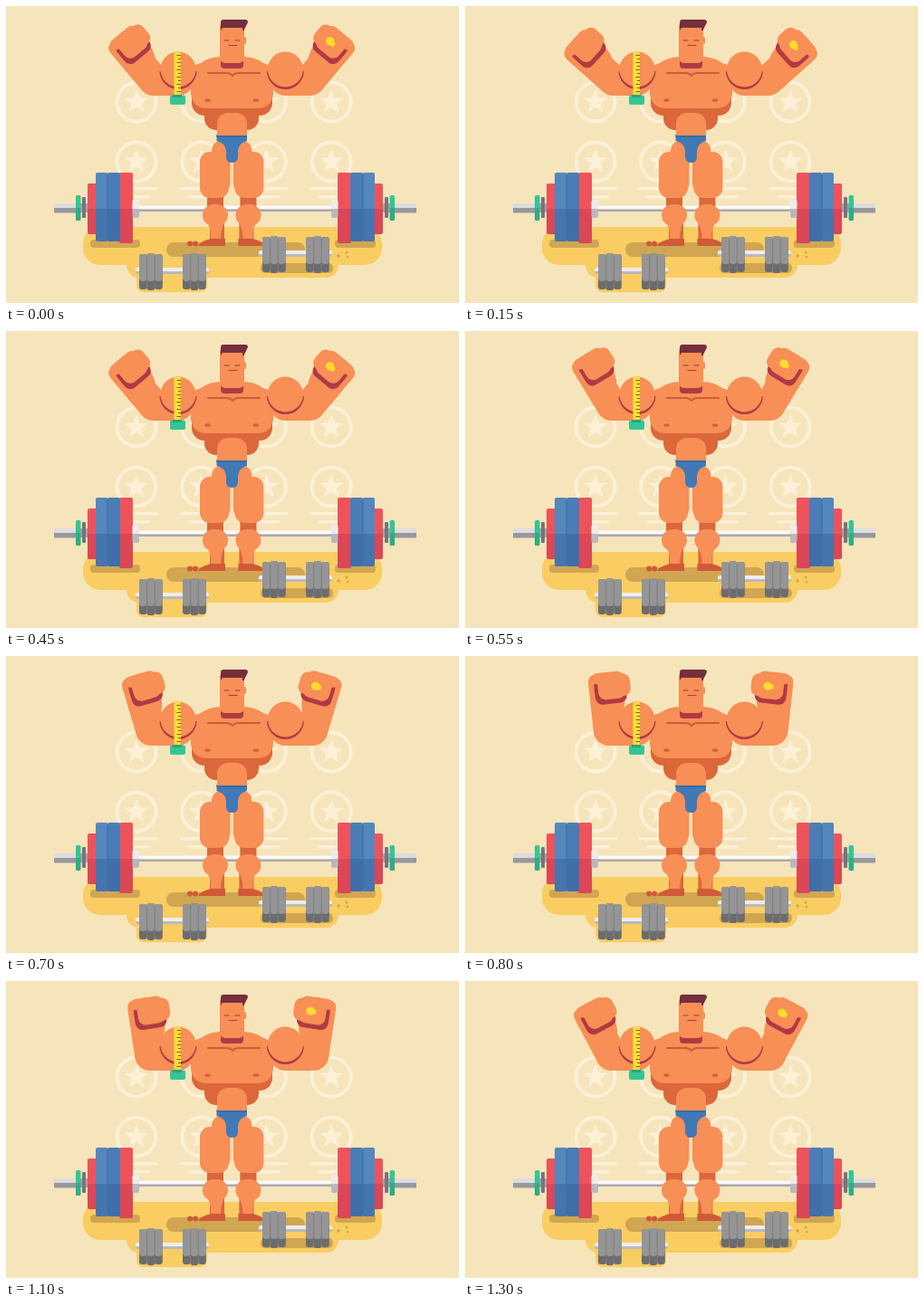
Write an HTML page with a canvas that moves like this. It is 500x328 px and loops after 1.35 s.

```html
<!DOCTYPE html>
<html lang="en">
<head>
<meta charset="utf-8">
<title>Bodybuilder</title>
<style>
  html, body { margin: 0; width: 100%; height: 100%; overflow: hidden; background: #f6e4bb; }
  canvas { display: block; }
</style>
</head>
<body>
<canvas id="stage" width="500" height="328"></canvas>
<script>
const ctx = document.getElementById('stage').getContext('2d');
const LOOP = 1350, STEP = 50, BODY_AXIS = 249.2, BAR_AXIS = 253;
const SKIN = '#f78f56', SHADE = '#dc673b', DARK = '#b23943';

// Arm flexion, one key every 225 ms, with a lead-in and lead-out key
const FLEX = [.5, .2, 0, .2, .62, 1, .79, .34, 0];

function box(x1, y1, x2, y2, r, color) {
  ctx.fillStyle = color;
  ctx.beginPath();
  ctx.roundRect(x1, y1, x2 - x1, y2 - y1, r);
  ctx.fill();
}

function disc(x, y, rx, color, ry = rx) {
  ctx.fillStyle = color;
  ctx.beginPath();
  ctx.ellipse(x, y, rx, ry, 0, 0, 7);
  ctx.fill();
}

function shape(d, color) {
  ctx.fillStyle = color;
  ctx.fill(new Path2D(d));
}

function line(d, color, width) {
  ctx.strokeStyle = color;
  ctx.lineWidth = width;
  ctx.lineJoin = ctx.lineCap = 'round';
  ctx.stroke(new Path2D(d));
}

function mirrored(axis, draw) {
  draw(false);
  ctx.save();
  ctx.translate(2 * axis, 0);
  ctx.scale(-1, 1);
  draw(true);
  ctx.restore();
}

// Rounded bar whose lower part is darker
function twoTone(x1, y1, x2, y2, mid, r, top, bottom) {
  box(x1, y1, x2, mid, [r, r, 0, 0], top);
  box(x1, mid, x2, y2, [0, 0, r, r], bottom);
}

function badge(x, y) {
  const color = '#fcf0d6';
  ctx.strokeStyle = color;
  ctx.lineWidth = 4;
  ctx.beginPath();
  ctx.arc(x, y, 21.5, 0, 7);
  ctx.stroke();
  ctx.fillStyle = color;
  ctx.beginPath();
  for (let i = 0; i < 10; i++) {
    const r = i % 2 ? 6 : 14, a = i * Math.PI / 5;
    ctx.lineTo(x + r * Math.sin(a), y - r * Math.cos(a));
  }
  ctx.fill();
}

function backdrop() {
  box(0, 0, 500, 328, 0, '#f6e4bb');
  for (let i = 0; i < 4; i++) {
    const x = 144 + i * 71.7;
    badge(x, 106);
    badge(x, 172);
    box(x - 24, 200, x + 24, 203.5, 1.5, '#fcf0d6');
    box(x - 15, 209, x + 15, 212.5, 1.5, '#fcf0d6');
  }
}

function floor() {
  const yellow = '#facd62', shadow = '#d0a652';
  box(85, 244, 415, 286, 19, yellow);
  box(133, 270, 367, 300, 14, yellow);
  box(144, 290, 222, 316, 8, yellow);
  box(177, 261, 330, 277, 8, shadow);
  box(281, 284, 361, 295, 5, shadow);
  box(93, 258, 148, 267, 4, shadow);
  box(363, 258, 408, 267, 4, shadow);
  disc(367, 276, 1.8, shadow);
  disc(376, 272, 1.5, shadow);
  disc(377, 277, 1.3, shadow);
}

function barbell() {
  twoTone(145, 220.5, 361, 227, 224.5, 0, '#fbfaf7', '#a9a8ad');
  mirrored(BAR_AXIS, () => {
    twoTone(53, 218, 78, 228.5, 223, 1, '#dddcde', '#98989e');
    box(82, 218, 91, 228, 0, '#a5a4a9');
    box(84, 211, 88, 234, 1, '#77757b');
    twoTone(77, 209, 82.5, 237, 223, 1.5, '#35c595', '#2cae85');
    twoTone(90, 196, 101, 252, 224, 2, '#ee535c', '#dc4656');
    twoTone(125, 184, 140, 262, 224, 2, '#ee535c', '#dc4656');
    twoTone(99, 184, 112.5, 260, 224, 2, '#5487bd', '#4675ae');
    twoTone(112, 184, 126, 260, 224, 2, '#4a7db6', '#406ea8');
    box(111.5, 186, 112.5, 258, 0, '#3f6ca4');
    twoTone(139.5, 214, 147, 234, 224, 2, '#eeecea', '#bab8bb');
  });
}

function dumbbell(x, y) {
  const light = '#959596', dark = '#6c6c6e';
  twoTone(x, y + 16, x + 81, y + 23, y + 20, 2, '#eeeded', '#bab9bc');
  for (const start of [4, 52])
    for (let i = 0; i < 3; i++) {
      const left = x + start + i * 8.5, tall = i === 1 ? 0 : 1;
      box(left, y + tall, left + 8.8, y + 41 - tall, 3, dark);
      box(left, y + tall, left + 8.8, y + 31, [3, 3, 4, 4], light);
      if (i) box(left - .3, y + 3, left + .7, y + 38, 0, '#7e7d80');
    }
}

function legs() {
  mirrored(BODY_AXIS, () => {
    box(222, 203, 240, 224, 4, SHADE);
    box(225, 238, 241, 262, 2, SHADE);
    shape('M212 265 Q214 260 226 257 H242 V265 Z', '#d05a36');
    disc(203, 262.500, 3, '#d05a36');
    disc(209, 262.500, 3, '#d05a36');
    shape('M220 236 H243 Q237 244 237 257 H226 Q227 245 220 236 Z', SKIN);
    box(217, 219, 245, 243, 12, SKIN);
    box(227, 149, 247.5, 206, 10, SKIN);
    box(214, 161, 246, 212, 11, SKIN);
  });
  shape('M232.500 142 H266 V149 Q257 151 256 160 V167 Q255.500 173 249.500 173 Q243.500 173 243 167 V160 Q242 151 232.500 149 Z', '#4079b5');
  box(232.5, 142, 266, 145, 0, '#376da7');
}

function torso() {
  box(219, 104, 279, 137, 13, SHADE);
  box(205, 78, 294, 121, 14, SHADE);
  box(233, 118, 266, 143, [12, 12, 0, 0], SKIN);
  shape('M237 56 H262 Q274 56 284 63 L295 67 V97 Q293 113 277 113 H222 Q206 113 204 97 V67 L215 63 Q225 56 237 56 Z', SKIN);
  line('M223 74 H243 Q248 74 250 77 Q252 74 257 74 H280', '#cf5b3a', 2);
  mirrored(BODY_AXIS, () => disc(222.500, 104, 3.2, '#d65f3d', 1.8));
}

function head() {
  box(237, 54, 262, 69, 4, DARK);
  box(236, 20, 263, 63, [2, 2, 6, 6], SKIN);
  box(262, 34, 265, 42, 2, SKIN);
  shape('M237 27 V18 Q237 15 240 15 H264 Q267 15 267 18 L263 26 V27 H261 V24 H239 Z', '#752e3c');
  line('M241 38 H246 M253 38 H258', '#9c3b3c', 1.1);
  line('M246 43.500 H255', '#b03d3c', 1.1);
}

function forearm(flex, banded) {
  ctx.rotate((flex - 1) * 50 * Math.PI / 180);
  shape('M-17 0 V-53 Q-17 -62 -8 -62 H12 Q22 -58 22 -40 Q22 -26 17 -17 V0 Z', SKIN);
  box(-11, -57, 24, -28, 8, DARK);
  box(-7, -63, 23, -33, 8, SKIN);
  box(8, -60, 29, -35, 8, SKIN);
  box(-13, -63, 12, -51, 6, SKIN);
  if (banded) {
    disc(10.5, -47, 5, '#ffdc2c', 4.5);
    box(4, -49, 8, -44, 1, '#ffdc2c');
  }
}

function arms(flex) {
  mirrored(BODY_AXIS, right => {
    const elbow = 164 - 6 * flex;
    box(elbow - 17, 65, 207, 99, 17, SKIN);
    ctx.save();
    ctx.translate(elbow, 82 - flex);
    forearm(flex, right);
    ctx.restore();
    ctx.save();
    ctx.beginPath();
    ctx.rect(165, 72, 52, 30);
    ctx.clip();
    disc(190, 71.5, 20.5, DARK);
    ctx.restore();
    disc(190, 70, 19.5, SKIN);
  });
}

function tape() {
  box(185.5, 51, 193, 101, 1, '#ffdf35');
  ctx.fillStyle = '#7b6036';
  for (let i = 0; i < 12; i++) ctx.fillRect(i % 2 ? 190 : 188.5, 54 + i * 4, i % 2 ? 3 : 4.5, 1);
  box(181, 98.5, 198, 109, 2, '#35c595');
  box(184, 98, 194, 101, 0, '#2aa57e');
}

function flexAt(ms) {
  const pos = ms / 225, i = Math.floor(pos), u = pos - i;
  const [a, b, c, d] = FLEX.slice(i, i + 4);
  return b + u / 2 * (c - a + u * (2 * a - 5 * b + 4 * c - d + u * (3 * (b - c) + d - a)));
}

function render(now) {
  const ms = Math.floor(now % LOOP / STEP) * STEP;
  backdrop();
  floor();
  barbell();
  legs();
  torso();
  head();
  arms(flexAt(ms));
  tape();
  dumbbell(279, 254);
  dumbbell(143, 273);
}

const start = performance.now();
function tick() {
  render(performance.now() - start);
  requestAnimationFrame(tick);
}
tick();
</script>
</body>
</html>
```
